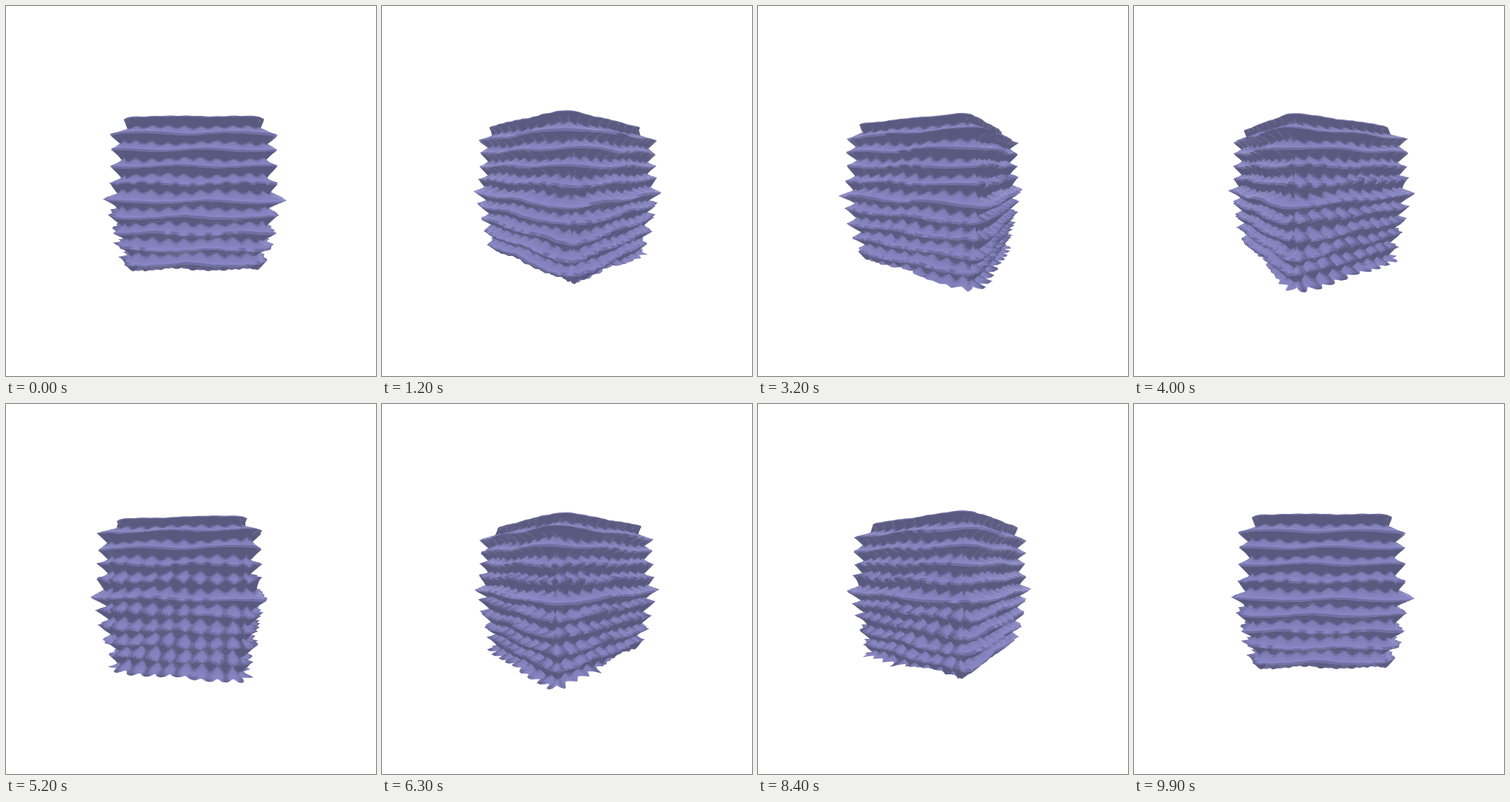
These frames come from a looping animation (512 by 512 pixels, 10 s). A matplotlib script:

```python
import numpy as np
import matplotlib.pyplot as plt
from matplotlib.animation import FuncAnimation
from matplotlib.collections import PolyCollection

SIZE, FRAMES = 512, 100
CX, HORIZON, DIST = 255, 222, 340
PITCH, TOP = 17.3, -51.5
POWER = 10
NU, NZ = 280, 100
DARK = np.array([89, 88, 127]) / 255
LIGHT = np.array([139, 137, 200]) / 255


def outline(t):
    """Rounded unit square and its outward normal."""
    s, c = np.sin(t), np.cos(t)
    r = (np.abs(s) ** POWER + np.abs(c) ** POWER) ** (-1 / POWER)
    x, y = r * s, r * c
    n = np.array([np.sign(x) * np.abs(x) ** (POWER - 1),
                  np.sign(y) * np.abs(y) ** (POWER - 1)])
    return x, y, n / np.hypot(*n)


def even_angles(n):
    t = np.linspace(0, 2 * np.pi, 4001)
    x, y, _ = outline(t)
    length = np.append(0, np.cumsum(np.hypot(np.diff(x), np.diff(y))))
    return np.interp(np.arange(n) / n * length[-1], length, t)


def wave(v):
    """Nearly triangular wave with softened tips."""
    return np.arcsin(0.96 * np.cos(v)) / np.arcsin(0.96)


def ridge(layer, lit, end):
    """Sawtooth that climbs over a lit share of each layer, and its glow."""
    s = (layer - end) % 1
    up = (s - 1 + lit) / lit
    height = np.where(up > 0, 2 * up - 1, 1 - 2 * s / (1 - lit))
    glow = (up > 0) * (0.7 + 0.3 * up) * np.clip(lit / 0.2, 0, 1)
    return height, glow


def build():
    t = even_angles(NU)[None, :]
    x, y, (nx, ny) = outline(t)
    v = np.linspace(0, 1, NZ)[:, None]
    depth = 117 - 4 * np.cos(t)
    z = TOP - 1.5 + v * (depth - TOP + 1.5)
    layer = (z - TOP) / PITCH
    width = np.interp(layer, range(10),
                      [77, 92, 92, 92, 93, 96, 93, 91, 88, 83])
    k = 2 * np.pi / PITCH

    # ridges run level; some sides break up into pyramids lower down
    rough = (0.25 * np.maximum(ny, 0) ** 2 + 0.5 * np.maximum(nx, 0) ** 2
             + np.minimum(ny, 0) ** 2 + np.minimum(nx, 0) ** 2)
    rise = np.clip((z + 30) / 45, 0.12, 1)
    patch = 0.9 + 0.3 * np.sin(5 * t + z / 19) * np.cos(3 * t - z / 27 + 1)
    belt = np.exp(-((layer - 5) / 0.4) ** 2)
    m = np.clip(rough * rise * patch, 0, 1) * (1 - 0.75 * belt)
    px, py = x * width, y * width + 7 * np.clip(1 - layer, 0, 1)
    cols = nx ** 2 * wave(k * py) + ny ** 2 * wave(k * px + 0.6)
    lit = 0.45 - 0.07 * m - (0.1 + 0.24 * m) * cols
    rows, glow = ridge(layer, lit, m * (lit / 2 - 0.25))
    jitter = np.sin(23 * t + 1.7 * layer) * np.sin(9 * t - 2.3 * layer)
    push = (6.8 * (rows - 1) + 4.5 * m * (cols - 1)
            + 1.2 * jitter + 2 * belt)
    z = z + 1.2 * np.sin(7 * t + 2 * layer) * np.clip(layer, 0.3, 1)
    return px + push * nx + 4, py + push * ny, z, glow


X, Y, Z, G = build()
i, j = np.meshgrid(np.arange(NZ - 1), np.arange(NU), indexing="ij")
j2 = (j + 1) % NU
QUADS = np.stack([i * NU + j, i * NU + j2,
                  (i + 1) * NU + j2, (i + 1) * NU + j], -1).reshape(-1, 4)
P = np.stack([X, Y, Z], -1).reshape(-1, 3)
COLORS = DARK + (LIGHT - DARK) * G.ravel()[QUADS].mean(1)[:, None]

fig = plt.figure(figsize=(SIZE / 100, SIZE / 100), dpi=100, facecolor="white")
ax = fig.add_axes([0, 0, 1, 1])
ax.set_xlim(0, SIZE)
ax.set_ylim(SIZE, 0)
ax.axis("off")
mesh = PolyCollection([], linewidths=0)
ax.add_collection(mesh, autolim=False)


def draw(frame):
    a = 2 * np.pi * frame / (FRAMES - 1)
    side = P[:, 0] * np.cos(a) - P[:, 1] * np.sin(a)
    near = P[:, 0] * np.sin(a) + P[:, 1] * np.cos(a)
    scale = DIST / (DIST - near)
    flat = np.stack([CX + side * scale, HORIZON + P[:, 2] * scale], -1)
    q = flat[QUADS]
    d1, d2 = q[:, 2] - q[:, 0], q[:, 3] - q[:, 1]
    front = np.flatnonzero(d1[:, 0] * d2[:, 1] - d1[:, 1] * d2[:, 0] > 0)
    order = front[np.argsort(near[QUADS[front]].mean(1))]
    q = q[order]
    c = q.mean(1, keepdims=True)
    mesh.set_verts(c + (q - c) * 1.25)  # overlap hides the seams
    mesh.set_facecolor(COLORS[order])
    return [mesh]


anim = FuncAnimation(fig, draw, frames=FRAMES, interval=100,
                     repeat=True, repeat_delay=0, blit=False)
plt.show()
```
